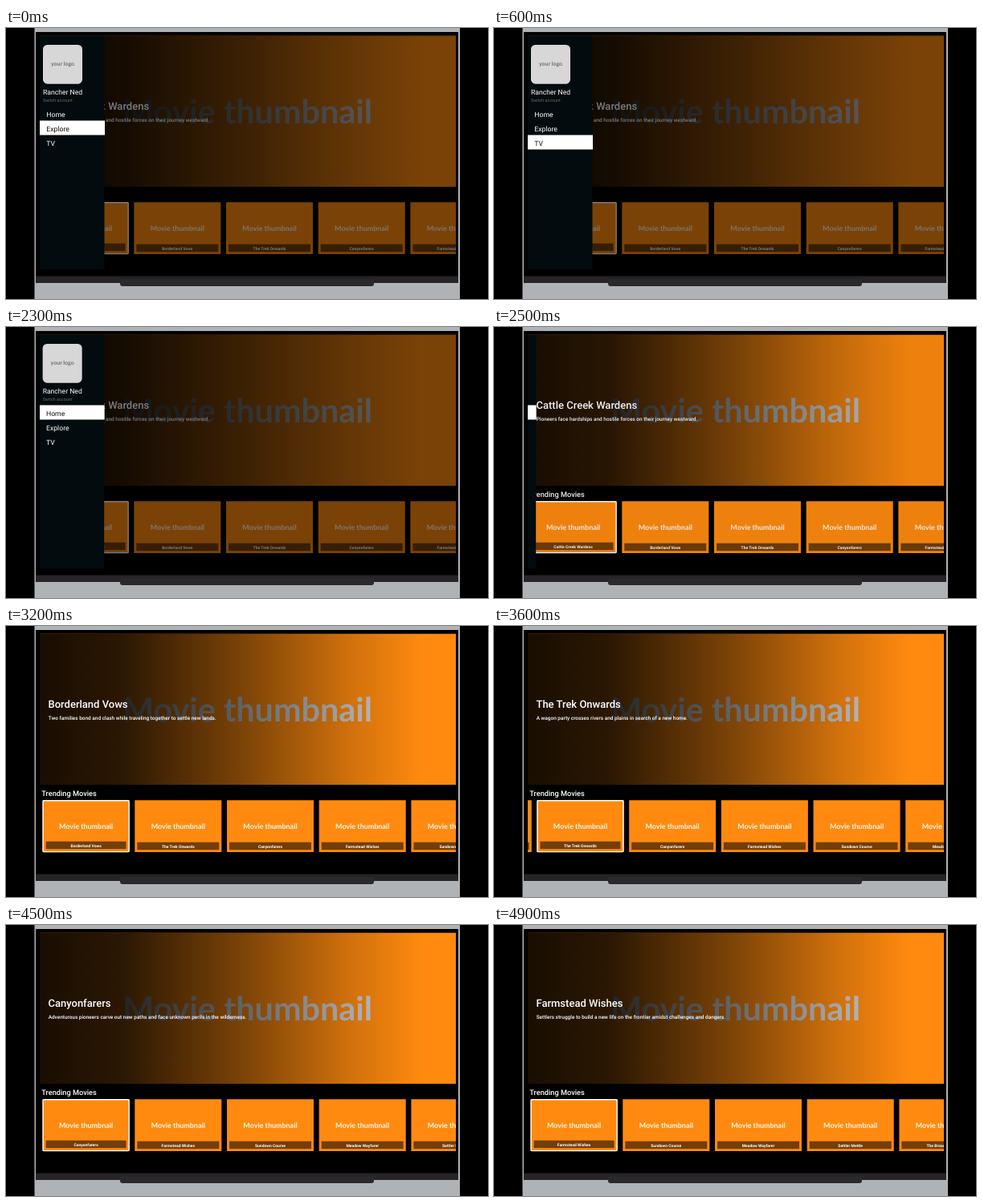
Recreate the animation shown at these times as an HTML page with a canvas. Size 600 by 338 pixels, loop 5 s.

```html
<!DOCTYPE html>
<html lang="en">
<head>
<meta charset="utf-8">
<title>TV menu</title>
<style>
  html, body { margin: 0; width: 100%; height: 100%; overflow: hidden; background: #000; }
  canvas { display: block; width: 600px; height: 338px; }
</style>
</head>
<body>
<canvas id="stage"></canvas>
<script>
const LOOP = 5000;
const ORANGE = '#ff8a0f';
const SCREEN = { x: 42, y: 9.5, w: 518, h: 292 };
const CARD = { y: 217.3, w: 108, h: 64.7, first: 44.6, pitch: 114.7 };
const MENU = { w: 80.5, row: 18, top: 97.5, items: ['Home', 'Explore', 'TV'] };
const CLOSE = { start: 2300, length: 230 };
const SCROLL = { start: 2833, every: 600, length: 200, steps: 4 };

const movies = [
  ['Cattle Creek Wardens', 'Pioneers face hardships and hostile forces on their journey westward.'],
  ['Borderland Vows', 'Two families bond and clash while traveling together to settle new lands.'],
  ['The Trek Onwards', 'A wagon party crosses rivers and plains in search of a new home.'],
  ['Canyonfarers', 'Adventurous pioneers carve out new paths and face unknown perils in the wilderness.'],
  ['Farmstead Wishes', 'Settlers struggle to build a new life on the frontier amidst challenges and dangers.'],
  ['Sundown Course'],
  ['Meadow Wayfarer'],
  ['Settler Mettle'],
  ['The Broad Furrow']
];

const canvas = document.getElementById('stage');
const ctx = canvas.getContext('2d');
const ratio = window.devicePixelRatio || 1;
canvas.width = 600 * ratio;
canvas.height = 338 * ratio;

const clamp = v => Math.max(0, Math.min(1, v));
const smooth = v => v * v * (3 - 2 * v);

function rect(x, y, w, h, fill) {
  ctx.fillStyle = fill;
  ctx.fillRect(x, y, w, h);
}

function rounded(x, y, w, h, radii, fill) {
  ctx.fillStyle = fill;
  ctx.beginPath();
  ctx.roundRect(x, y, w, h, radii);
  ctx.fill();
}

function text(str, x, y, size, { fill = '#fff', weight = 400, face = 'Roboto', align = 'left' } = {}) {
  ctx.font = `${weight} ${size}px ${face}, sans-serif`;
  ctx.fillStyle = fill;
  ctx.textAlign = align;
  ctx.fillText(str, x, y);
}

function drawTelevision() {
  rect(0, 0, 600, 338, '#000');
  rect(35.5, 0, 529.5, 338, '#b0b3b6');
  rect(37, 5, 526, 313, '#000');
  rect(37, 309.5, 526, 8.5, '#262426');
  rounded(142, 313.5, 316, 8.5, [0, 0, 3, 3], '#2b292b');
}

function drawHero([title, summary]) {
  const { x, y, w } = SCREEN, h = 188.5;
  rect(x, y, w, h, ORANGE);
  text('Movie thumbnail', 300.5, 119, 41.3, { fill: '#c9ced3', weight: 700, face: 'Lato', align: 'center' });
  const shade = ctx.createLinearGradient(x, 0, x + w, 0);
  [[0, .9], [.2, .83], [.5, .5], [.75, .18], [.92, 0]].forEach(
    ([stop, alpha]) => shade.addColorStop(stop, `rgba(0,0,0,${alpha})`));
  rect(x, y, w, h, shade);
  text(title, 52.5, 102, 13, { weight: 500 });
  text(summary, 52.7, 117, 6.45, { weight: 500 });
}

function drawCard(x, title, focused) {
  const { y, w, h } = CARD, mid = x + w / 2;
  const inset = focused ? 4 : 3, lift = focused ? 1 : 0;
  rect(x, y, w, h, ORANGE);
  text('Movie thumbnail', mid, 253, 8.95, { fill: '#fff6ea', weight: 700, face: 'Lato', align: 'center' });
  rect(x + inset, 269.7 - lift, w - 2 * inset, 9.5, 'rgba(0,0,0,.55)');
  text(title, mid, 276.6 - lift, 5, { weight: 700, align: 'center' });
  if (focused) {
    ctx.strokeStyle = '#fff';
    ctx.lineWidth = 1.4;
    ctx.beginPath();
    ctx.roundRect(x + .5, y + .4, w - 1, h - .8, 1);
    ctx.stroke();
  }
}

function drawMenu(open, selected) {
  ctx.save();
  ctx.translate(SCREEN.x - (1 - open) * MENU.w, 0);
  rect(0, SCREEN.y, MENU.w, SCREEN.h, '#020b0d');
  rounded(4, 21, 49, 48.7, 5.5, '#d7d7d7');
  text('your logo', 28.5, 47.3, 7, { fill: '#707070', weight: 700, face: 'Lato', align: 'center' });
  text('Rancher Ned', 4, 83.2, 8.6);
  text('Switch account', 4, 91.7, 5.4, { fill: '#6c6f70' });
  MENU.items.forEach((item, i) => {
    const y = MENU.top + i * MENU.row, active = i === selected;
    if (active) rect(0, y, MENU.w + .5, MENU.row, '#fff');
    text(item, 8.3, y + 13.6, 8.7, { fill: active ? '#111' : '#fff' });
  });
  ctx.restore();
}

function selectedItem(t) {
  if (t < 450) return 1;
  if (t < 1050) return 2;
  return t < 1650 ? 1 : 0;
}

function render(t) {
  const open = 1 - clamp((t - CLOSE.start) / CLOSE.length);
  let focus = 0, scroll = 0;
  for (let i = 0; i < SCROLL.steps; i++) {
    const age = t - SCROLL.start - i * SCROLL.every;
    if (age < 0) break;
    focus = i + 1;
    scroll += smooth(clamp(age / SCROLL.length)) * (CARD.pitch - (i ? 0 : 1));
  }

  ctx.setTransform(ratio, 0, 0, ratio, 0, 0);
  ctx.textRendering = 'geometricPrecision';
  drawTelevision();

  ctx.save();
  ctx.beginPath();
  ctx.rect(SCREEN.x, SCREEN.y, SCREEN.w, SCREEN.h);
  ctx.clip();
  drawHero(movies[focus]);
  text('Trending Movies', 44.3, 212, 9.2, { weight: 500 });
  movies.forEach(([title], i) => {
    const x = CARD.first + i * CARD.pitch - scroll;
    if (x < 560 && x + CARD.w > SCREEN.x) drawCard(x, title, i === focus);
  });
  if (open > 0) {
    rect(SCREEN.x, SCREEN.y, SCREEN.w, SCREEN.h, `rgba(0,0,0,${.52 * open})`);
    drawMenu(open, selectedItem(t));
  }
  ctx.restore();
}

const begin = performance.now();
function frame() {
  render((performance.now() - begin) % LOOP);
  requestAnimationFrame(frame);
}
frame();
</script>
</body>
</html>
```
